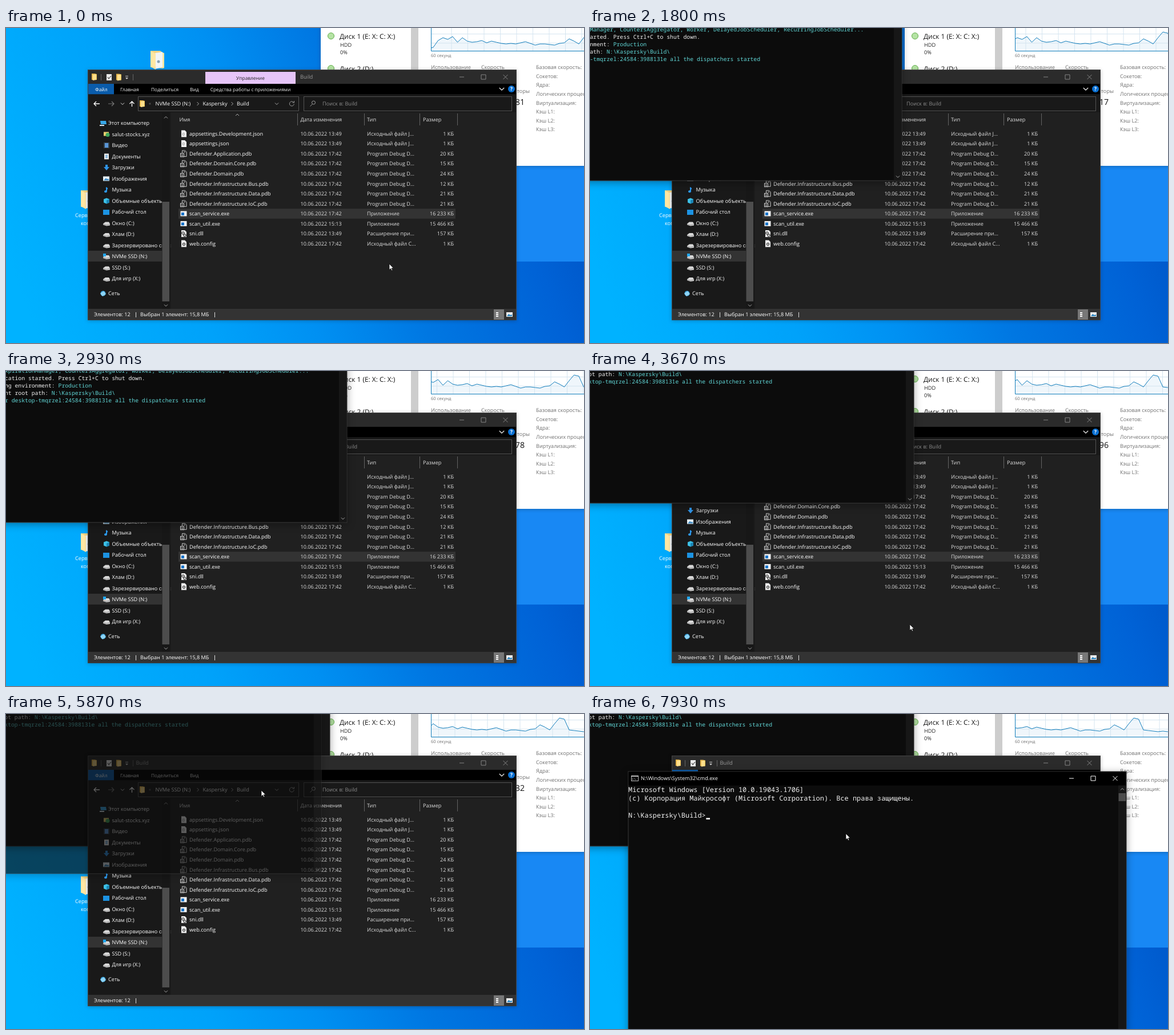
Recreate the animation shown at these times as an HTML page. Size 1012 by 553 pixels, loop 8 s.

```html
<!DOCTYPE html>
<html lang="ru">
<head>
<meta charset="utf-8">
<title>Desktop</title>
<style>
  html, body { margin: 0; width: 100%; height: 100%; overflow: hidden; background: #0090f0; }
  svg { display: block; width: 100vw; height: 100vh; }
  text { white-space: pre; text-rendering: geometricPrecision; font-family: "Open Sans", "Noto Sans", sans-serif; }
  .mono { font-family: "Noto Sans Mono", "DejaVu Sans Mono", monospace; }
  .line { fill: none; stroke: currentColor; }
  .shade { filter: drop-shadow(0 3px 7px rgba(0, 0, 0, .35)); }
  .faint { filter: drop-shadow(0 1px 3px rgba(0, 0, 0, .25)); }
</style>
</head>
<body>
<svg id="stage" viewBox="0 0 1012 553" preserveAspectRatio="none"></svg>
<script>
const LOOP = 8000;
const stage = document.getElementById('stage');
const $ = id => document.getElementById(id);

// Markup helpers; text is placed by its vertical centre
const T = (x, y, s, fill = '#fff', size = 9.15, attr = '') =>
  `<text x="${x}" y="${(y + size * .36).toFixed(2)}" fill="${fill}" font-size="${size}" ${attr}>${s}</text>`;
const R = (x, y, w, h, fill, attr = '') =>
  `<rect x="${x}" y="${y}" width="${w}" height="${h}" fill="${fill}" ${attr}/>`;
const P = (d, color = '#fff', width = 1, attr = '') =>
  `<path class="line" d="${d}" color="${color}" stroke-width="${width}" ${attr}/>`;
const F = (d, fill) => `<path d="${d}" fill="${fill}"/>`;
const at = (x, y, s) => `<g transform="translate(${x} ${y})">${s}</g>`;
const chevron = (x, y, turn = 0, color = '#aaa', k = 1) =>
  `<g transform="translate(${x} ${y}) rotate(${turn}) scale(${k})">${P('M-3 -1.5L0 1.5L3 -1.5', color)}</g>`;
const controls = (right, y, color) => at(right, y,
  P('M-100 0h8M-62 -4h8v8h-8zM-23.5 -4l8 8m0 -8l-8 8', color));

const folder = (x, y) => at(x, y, F('M0 0h5l4 1v10h-9z', '#e9b84c') + F('M2 2l6 -1v10l-6 1z', '#ffdf8c'));
const bigFolder = (x, y) => at(x, y,
  F('M0 1h17l4 3v28l-21 -2z', '#f3d382') + F('M8 5l13 -2v27l-13 3z', '#f1f5f7') +
  F('M0 1l9 5v28l-9 -5z', '#ffe7a3') + F('M21 4l3 1v26l-3 1z', '#ffe7a3') +
  `<circle cx="14" cy="20" r="2.5" fill="#8ba3b4"/>`);
const page = F('M-4 -6h6l3 3v9h-9z', '#f2f2f2');
const gear = (x, y) => `<circle cx="${x}" cy="${y}" r="2" fill="none" stroke="#555" stroke-width="1.5"/>`;
const fileIcon = {
  json: page + T(-2.6, 0, '{}', '#555', 6),
  pdb: P('M-2.500 -5.500h5l2.500 2.500v8h-7.500z', '#ccc') + R(-5.5, -.5, 6, 6, '#202020', 'stroke="#ddd"') +
    P('M-4 2h3M-4 4h3M0 -3h3', '#ccc'),
  exe: R(-5.5, -4.5, 11, 9, '#f4f4f4') + R(-4, -2, 5, 5, '#1673c9'),
  dll: page + gear(-1, -1) + gear(2, 3),
  config: page + gear(.5, 1),
};

const drive = F('M-6 1l4 -3h6l2 3v3l-6 1l-6 -2z', '#d9d9d9') + P('M-6 1.5l6 2l6 -2', '#777', .7);
const globe = `<circle r="4.5" fill="#36a3e0"/>` + F('M-5 0l6 -4l4 5l-6 4z', '#8fd4f5');
const sideIcon = {
  pc: F('M-5 -4h10l1 6h-10z', '#38a8e8') + R(-6, 3, 8, 2, '#d5e4ee'),
  web: R(-5, -4, 9, 7, '#e8cf70') + `<circle cx="2" cy="1" r="3.5" fill="#3ea85d"/>`,
  video: R(-5, -5, 10, 10, '#33434e') + R(-3, -4, 6, 8, '#5a96d8'),
  doc: R(-4, -5, 8, 10, '#eee') + P('M-2 -2h4M-2 0h4M-2 2h4', '#3288cc'),
  load: F('M-2 -5h4v4h3l-5 6l-5 -6h3z', '#2f93e6'),
  image: R(-6, -4, 11, 8, '#e6f1f8') + F('M-5 3l4 -4l2 2l2 -1l2 3z', '#3b87c0'),
  music: F('M-1 -5c2 1 4 2 3 5l-1 -2v5a2.5 2 0 1 1 -2 -2z', '#2d9af0'),
  cube: F('M-5 -3l5 -2l5 2v6l-5 2l-5 -2z', '#3cc0e6') + F('M0 -1l5 -2v6l-5 2z', '#1b84b4'),
  desk: R(-6, -4, 11, 9, '#1c93e3'),
  drive, net: globe,
  system: drive + R(-6, -5, 5, 5, '#22a7f0'),
};

// Wallpaper, desktop icons and task manager
function desktop() {
  const grey = '#707070';
  const specs = ['Базовая скорость:', 'Сокетов:', 'Ядра:', 'Логических процессоров:', 'Виртуализация:', 'Кэш L1:', 'Кэш L2:', 'Кэш L3:'];
  const bulb = y => `<circle cx="569" cy="${y}" r="5.5" fill="#b5e3a4" stroke="#62ad4c"/>`;
  return `<defs>
    <linearGradient id="sky" gradientUnits="userSpaceOnUse" x1="0" y1="400" x2="900" y2="60">
      <stop offset="0" stop-color="#00b2ff"/><stop offset=".3" stop-color="#00a2fa"/>
      <stop offset=".48" stop-color="#0090f2"/><stop offset=".67" stop-color="#0077e2"/>
      <stop offset=".9" stop-color="#0062d6"/><stop offset="1" stop-color="#0058ca"/>
    </linearGradient>
    <clipPath id="plot"><rect x="744" width="268" height="40"/></clipPath></defs>` +
    R(0, 0, 1012, 553, 'url(#sky)') + R(800, 160, 212, 250, '#1888f4') +
    bigFolder(253, 39) + bigFolder(131, 284) +
    T(121, 329, 'Сервера') + T(131, 343, 'копия') +
    R(551, -20, 480, 262, '#fff', 'class="faint"') + R(709, 0, 13, 242, '#cdcdcd') +
    bulb(14) + bulb(71) +
    T(584, 15, 'Диск 1 (E: X: C: X:)', '#111', 11.9) + T(585, 30, 'HDD', '#222', 9.2) + T(585, 43, '0%', '#222', 9.2) +
    T(584, 72, 'Диск 2 (D:)', '#111', 11.9) +
    `<g clip-path="url(#plot)"><path id="area" fill="#eff6fb"/><path id="grid" class="line" color="#d5e5f0"/>
     <path id="curve" class="line" color="#117dbb"/></g>` +
    P('M744.5 0V40.5H1012', '#117dbb') +
    T(744, 48, '60 секунд', grey, 7.6) + T(744, 69, 'Использование', grey) + T(832, 69, 'Скорость', grey) +
    specs.map((s, i) => T(928, 69 + i * 15.6, s, grey)).join('') +
    T(917, 111, 'Дескрипторы', grey, 9.15, 'text-anchor="end"') +
    T(908, 130, '', '#111', 14.2, 'id="count" text-anchor="end"');
}

const files = [
  ['appsettings.Development.json', '13:49', 'Исходный файл J...', '1'],
  ['appsettings.json', '13:49', 'Исходный файл J...', '1'],
  ['Defender.Application.pdb', '17:42', 'Program Debug D...', '20'],
  ['Defender.Domain.Core.pdb', '17:42', 'Program Debug D...', '15'],
  ['Defender.Domain.pdb', '17:42', 'Program Debug D...', '24'],
  ['Defender.Infrastructure.Bus.pdb', '17:42', 'Program Debug D...', '12'],
  ['Defender.Infrastructure.Data.pdb', '17:42', 'Program Debug D...', '21'],
  ['Defender.Infrastructure.IoC.pdb', '17:42', 'Program Debug D...', '21'],
  ['scan_service.exe', '17:42', 'Приложение', '16 233'],
  ['scan_util.exe', '15:13', 'Приложение', '15 466'],
  ['sni.dll', '13:49', 'Расширение при...', '157'],
  ['web.config', '17:42', 'Исходный файл C...', '1'],
];
const places = [
  ['pc', 'Этот компьютер'], ['web', 'salut-stocks.xyz'], ['video', 'Видео'], ['doc', 'Документы'],
  ['load', 'Загрузки'], ['image', 'Изображения'], ['music', 'Музыка'], ['cube', 'Объемные объекты'],
  ['desk', 'Рабочий стол'], ['drive', 'Окно (C:)'], ['drive', 'Хлам (D:)'], ['drive', 'Зарезервировано системой'],
  ['system', 'NVMe SSD (N:)'], ['drive', 'SSD (S:)'], ['drive', 'Для игр (X:)'],
];
const rowY = i => 185.5 + i * 17.55;

function explorer() {
  const place = ([icon, name], i) => {
    const y = 167 + i * 19.5, dx = i ? 0 : -6;
    return at(176 + dx, y, sideIcon[icon]) + T(i ? 185.5 : 179, y, name);
  };
  const file = ([name, time, kind, size], i) => {
    const y = rowY(i);
    return at(311, y, fileIcon[name.split('.').pop()]) + T(321, y, name) +
      T(515.5, y, '10.06.2022 ' + time, '#ddd') + T(632, y, kind, '#ddd') +
      T(784, y, size + ' КБ', '#ddd', 9.15, 'text-anchor="end"');
  };
  const caption = R(143.5, 73.5, 750, 439, '#202020', 'id="frame" stroke="#454545"') +
    R(144, 74, 749, 24, '#2b2b2b', 'id="bar"') +
    folder(150, 80) + P('M166.5 81v11M222.5 81v11', '#666') +
    R(176, 81, 9, 11, '#eee') + P('M178 86l2 3l4 -5', '#444', 1.2) + folder(193, 80.5) +
    P('M209 84.5h5', '#ccc') + F('M209 87h5l-2.5 3z', '#ccc') +
    T(0, 86, 'Build', '#999', 9.4, 'id="caption"') + `<g id="buttons">${controls(894, 86, 'inherit')}</g>`;
  const ribbon = R(144, 98, 749, 18.5, '#000') + R(144, 98, 45, 18.5, '#0a5cab') +
    T(156, 107.5, 'Файл', '#fff', 8.4) + T(200, 107.5, 'Главная', '#eee', 8.4) +
    T(254, 107.5, 'Поделиться', '#eee', 8.4) + T(322, 107.5, 'Вид', '#eee', 8.4) +
    `<g id="tools">${R(349, 77, 158, 21, '#e6c5f8')}` +
    T(428, 88, 'Управление', '#222', 8.4, 'text-anchor="middle"') +
    T(428, 107.5, 'Средства работы с приложениями', '#eee', 8.4, 'text-anchor="middle"') + `</g>` +
    chevron(868, 107, 0, '#ddd', 1.4) + `<circle cx="885" cy="107" r="6" fill="#0a70d2"/>` +
    T(885, 107, '?', '#fff', 9, 'text-anchor="middle" font-weight="bold"');
  const nav = R(144, 116.5, 749, 32, '#191919') +
    P('M164 133h-10m4 -4l-4 4l4 4M220.500 138v-9m-4 4l4 -4l4 4', '#fff', 1.3) +
    P('M179 133h10m-4 -4l4 4l-4 4', '#777', 1.2) + chevron(204, 133, 0, '#ddd') +
    R(231.5, 120.5, 281, 25, '#191919', 'stroke="#535353"') + folder(234, 127) +
    `<g id="crumbs">${T(250, 132, '«', '#777', 8)}${T(261.5, 133, 'NVMe SSD (N:)')}${chevron(336, 133, -90)}` +
    T(344.5, 133, 'Kaspersky') + chevron(396, 133, -90) + T(404, 133, 'Build') + `</g>` +
    `<g id="edit">${P('M231.5 120.500H512.500V145.500H231.500ZM462 121v24M486.500 121v24', '#666')}` +
    R(250, 126, 0, 14, '#0078d7', 'id="mark"') + T(250, 133, '', '#fff', 9.15, 'id="typed"') + `</g>` +
    chevron(474, 133) + P('M503.500 130.500a4 4 0 1 0 .8 3M504.500 128v3h-3', '#999') +
    R(521.5, 120.5, 364, 25, '#191919', 'stroke="#535353"') +
    `<circle cx="538.500" cy="131" r="3" fill="none" stroke="#999"/>` + P('M536.500 133.500l-4 4', '#999') +
    T(554, 133, 'Поиск в: Build', '#8b8b8b');
  const side = R(144, 148, 144, 345, '#191919') + R(144, 391, 129, 19, '#333') +
    places.map(place).join('') + at(170, 466, sideIcon.net) + T(179, 466, 'Сеть') +
    R(273, 148, 13, 345, '#171717') + R(273.5, 305, 12.5, 175, '#4d4d4d') +
    chevron(280, 157, 180) + chevron(280, 487) + R(286, 148, 2.5, 345, '#191919');
  const list = R(288.5, 148, 604.5, 345, '#202020') +
    P('M510.500 150v21M627.500 150v21M724.500 150v21M790.500 150v21', '#636363') + chevron(405, 152.5, 180) +
    T(303.5, 161, 'Имя', '#ddd') + T(515.5, 161, 'Дата изменения', '#ddd') + T(632, 161, 'Тип', '#ddd') + T(730, 161, 'Размер', '#ddd') +
    R(302, 0, 485, 17.5, '#4d4d4d', 'id="hover"') + R(302, rowY(8) - 8.7, 485, 17.5, '#333', 'id="picked"') +
    files.map(file).join('');
  const status = R(144, 493, 749, 19.5, '#333') + T(154, 503, 'Элементов: 12') + P('M227.500 499v9', '#ddd') +
    `<g id="chosen">${T(235, 503, 'Выбран 1 элемент: 15,8 МБ')}${P('M365.500 499v9', '#ddd')}</g>` +
    R(854, 494, 18, 18, '#777') + P('M860 499v9', '#fff', 4, 'stroke-dasharray="2 1"') +
    R(876, 499, 11, 8, '#eee') + F('M877 506l3 -4l3 2l3 -1v3z', '#3288c0');
  const hints = `<g id="hints">${R(248.5, 146.5, 264, 100, '#2b2b2b', 'stroke="#555"')}${T(253, 156, 'cmd')}</g>`;
  return caption + ribbon + nav + side + list + status + hints;
}

// Console window of 120 x 30 cells
function terminal(title, icon, cw, lh, lines) {
  const w = 120 * cw + 14, h = 30 * lh + 24, size = cw / .6;
  const row = (s, i) => T(0, 24.5 + (i + .5) * lh, s, '#f2f2f2', size, 'class="mono"');
  return R(0, 0, w, h, '#0c0c0c', 'class="shade" stroke="#3b3b3b"') + R(.5, .5, w - 1, 24, '#000') +
    at(11.5, 12, icon) + T(22, 12, title) + controls(w, 12, '#fff') +
    R(w - 14, 24.5, 13.5, h - 25, '#171717') + R(w - 13.5, 38, 12.5, 14, '#4d4d4d') +
    chevron(w - 7, 31, 180) + chevron(w - 7, h - 7) +
    `<g class="out">${lines.map(row).join('')}</g>`;
}

const tint = (c, s) => `<tspan fill="${c}">${s}</tspan>`;
const stamp = tint('#767676', '[') + tint('#ccc', '18:10:49') + ' INF' + tint('#767676', ']') + ' ';
const host = 'Server desktop-tmqrzel:24584:3988131e';
const logLines = [
  "^{Starting Hangfire Server using job storage: 'Hangfire.MemoryStorage.MemoryStorage'}",
  '^{Using the following options for Hangfire Server:}',
  '{    Worker count: 20}',
  "{    Listening queues: 'default'}",
  '{    Shutdown timeout: 00:00:15}',
  '{    Schedule polling interval: 00:00:15}',
  '^Now listening on: {http://localhost:5001}',
  `^{${host} successfully announced in 24,8972 ms}`,
  `^{${host} is starting the registered dispatchers: ServerWatchdog, ServerJobCa}`,
  '{ncellationWatcher, ExpirationManager, CountersAggregator, Worker, DelayedJobScheduler, RecurringJobScheduler...}',
  '^Application started. Press Ctrl+C to shut down.',
  '^Hosting environment: {Production}',
  String.raw`^Content root path: {N:\Kaspersky\Build\}`,
  `^{${host} all the dispatchers started}`,
].map(s => s.replace('^', stamp).replace(/\{(.*?)\}/g, (_, v) => tint('#61d6d6', v)));
const cmdLines = [
  'Microsoft Windows [Version 10.0.19043.1706]',
  '(c) Корпорация Майкрософт (Microsoft Corporation). Все права защищены.',
  '',
  String.raw`N:\Kaspersky\Build>`,
];
const cmdPath = String.raw`N:\Windows\System32\cmd.exe`;
const cmdIcon = R(-6, -4.5, 12, 9, '#000', 'stroke="#bbb"') + R(-6, -5, 12, 2, '#bbb') + T(-5, .8, 'C:\\.', '#fff', 5);
const zooms = [[5.85, 13], [6.5, 14], [7.15, 15]];
const prompt = ([cw, lh]) => terminal(cmdPath, cmdIcon, cw, lh, cmdLines) +
  R(19 * cw + .5, 24.5 + 4 * lh - 3, cw - .5, 2.6, '#fff', 'class="out"');

stage.innerHTML = `<g>${desktop()}</g><g id="explorer">${explorer()}</g>` +
  `<g id="log">${terminal(String.raw`N:\Kaspersky\Build\scan_service.exe`, fileIcon.exe, 5.85, 13, logLines)}</g>` +
  `<g id="cmd">${zooms.map(z => `<g>${prompt(z)}</g>`).join('')}</g>` +
  `<g id="arrow"><path d="M0 0V10.500L2.500 8.300L4.200 12L5.800 11.300L4.200 7.700H7.500Z" fill="#fff" stroke="#000" stroke-width=".7"/></g>` +
  `<g id="beam">${P('M-2.500 -5h2l.5 .5l.5 -.5h2M0 -4.500v9M-2.500 5h2l.5 -.5l.5 .5h2', '#fff')}</g>`;

// Motion: [time, x, y]
const logPath = [[2210, -170, -146], [2467, 116, 38], [2540, 148, 64], [2670, 120, 40], [2800, -20, -70], [2933, -119, -148], [3070, -146, -179], [3133, -149, -182]];
const cmdMove = [[6800, -149, -125], [6867, -95, -39], [6933, -20, 28], [7000, 36, 74], [7067, 60, 95], [7133, 67, 101]];
const mouse = [[10, 671, 414], [200, 600, 385], [400, 440, 335], [533, 404, 326], [610, 404, 326], [667, 404, 325], [1600, 404, 325], [1800, 320, -40],
  [3210, 303, -174], [3333, 380, 60], [3533, 530, 390], [3667, 560, 445], [3870, 560, 445], [4000, 540, 380], [4267, 460, 160], [4400, 447, 134],
  [6270, 447, 134], [6400, 425, -20], [7810, 550, 113], [7867, 500, 160], [7933, 448, 210]];
const updates = [190, 1260, 2260, 3260, 4260, 5260, 6320, 7390];
const counts = ['3181', '3149', '3217', '3178', '3196', '3204', '3232', '3161', '3158'];
const load = [36, 34, 22, 17, 20, 15, 25, 17, 23, 25, 24, 22, 26, 23, 25, 27, 28, 27, 28, 26, 24, 27, 30, 28, 28, 29, 30,
  27, 26, 19, 23, 28, 17, 7, 9, 28, 29, 30, 31, 30, 31, 30, 30];

function along(path, t) {
  const i = path.findIndex(p => p[0] > t);
  if (i < 0) return path[path.length - 1].slice(1);
  if (!i) return path[0].slice(1);
  const [t0, x0, y0] = path[i - 1], [t1, x1, y1] = path[i], p = (t - t0) / (t1 - t0);
  return [x0 + (x1 - x0) * p, y0 + (y1 - y0) * p];
}
const show = (node, on) => node.style.display = on ? '' : 'none';

// Fade and grow from the window's centre
function place(node, [x, y], w, h, t, open) {
  const p = Math.max(0, Math.min(1, (t - open) / 200)), s = .9 + .1 * p;
  show(node, p > 0);
  node.setAttribute('opacity', Math.min(1, p * 1.12));
  node.setAttribute('transform', `translate(${x + w / 2 * (1 - s)} ${y + h / 2 * (1 - s)}) scale(${s})`);
}

function drawChart(k) {
  const pts = load.map((v, i) => `${739.5 + 8.5 * (i - k)} ${v}`).join('L');
  $('curve').setAttribute('d', 'M' + pts);
  $('area').setAttribute('d', `M${pts}V40H740Z`);
  let grid = 'M744 10.500H1012M744 26.500H1012';
  for (let x = 780 - 8.5 * k % 28.5; x < 1012; x += 28.5) grid += `M${x} 0V40`;
  $('grid').setAttribute('d', grid);
  $('count').textContent = counts[k];
}

function address(t) {
  if (t < 4460 || t >= 5720) return '';
  if (t < 4660) return String.raw`N:\Kaspersky\Build`;
  if (t < 5190) return cmdPath;
  return 'cmd'.slice(0, t < 5320 ? 1 : t < 5390 ? 2 : 3);
}

function drawExplorer(t, x, y) {
  const active = t >= 1260 && t < 1390 || t >= 3860 && t < 5720;
  const picked = t < 3860, text = address(t);
  $('frame').setAttribute('class', active ? 'shade' : 'faint');
  $('bar').setAttribute('fill', active ? '#000' : '#2b2b2b');
  $('caption').setAttribute('fill', active ? '#fff' : '#999');
  $('caption').setAttribute('x', picked ? 515 : 227.5);
  $('buttons').firstChild.firstChild.setAttribute('color', active ? '#fff' : '#858585');
  for (const id of ['tools', 'chosen', 'picked']) show($(id), picked);
  show($('crumbs'), !text);
  show($('edit'), text);
  show($('hints'), t >= 5190 && t < 5720);
  $('typed').textContent = text;
  $('mark').setAttribute('width', text && t < 5190 ? $('typed').getComputedTextLength() : 0);
  const row = Math.floor((y - 176.8) / 17.55);
  const over = x > 302 && x < 787 && row >= 0 && row < 12 && (t < 1600 || t > 3200 && t < 4400);
  show($('hover'), over);
  $('hover').setAttribute('y', rowY(row) - 8.7);
  $('picked').setAttribute('fill', over && row === 8 ? '#777' : '#333');
}

function draw(time) {
  const t = Math.floor((time + 4) * .015) / .015;
  const logAt = along(logPath, t), cmdAt = along(cmdMove, t);
  const zoom = t < 7450 ? 0 : t < 7720 ? 1 : 2;

  let [x, y] = along(mouse, t);
  if (t > 2000 && t < 3200) [x, y] = [logAt[0] + 452, logAt[1] + 8];
  if (t > 6600 && t < 7810) [x, y] = [cmdAt[0] + 483, cmdAt[1] + 12];
  const beam = t >= 4330 && t < 5790;
  show($('arrow'), !beam);
  show($('beam'), beam);
  $(beam ? 'beam' : 'arrow').setAttribute('transform', `translate(${x} ${y})`);

  drawChart(updates.filter(u => t >= u).length);
  drawExplorer(t, x, y);

  const next = $(t < 3860 ? 'cmd' : 'explorer');
  if ($('log').nextSibling !== next) stage.insertBefore($('log'), next);
  place($('log'), logAt, 716, 414, t, 1367);
  const shown = t < 1590 ? 0 : t < 1720 ? 6 : t < 1790 ? 10 : 14;
  [...$('log').querySelector('.out').children].forEach((line, i) => show(line, i < shown));

  place($('cmd'), cmdAt, 716, 414, t, 5750);
  [...$('cmd').children].forEach((g, i) => show(g, i === zoom));
  $('cmd').querySelectorAll('.out').forEach(n => show(n, t >= 6060));
}

const start = performance.now();
function tick() {
  draw((performance.now() - start) % LOOP);
  requestAnimationFrame(tick);
}
tick();
</script>
</body>
</html>
```
